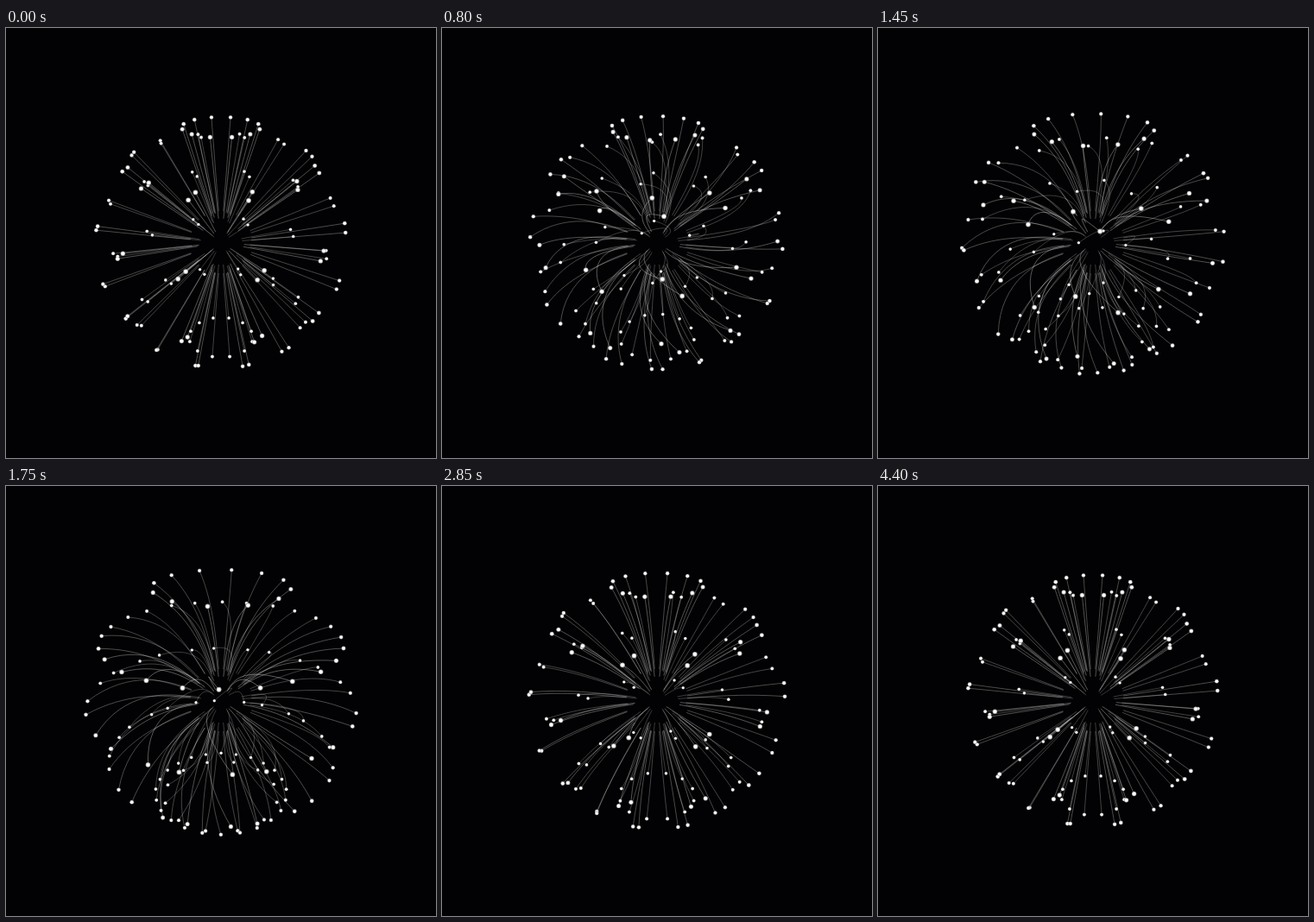
Recreate the animation shown at these times as an HTML page with a canvas. Size 498 px wide and 498 px high, loop 4450 ms.

```html
<!DOCTYPE html>
<html lang="en">
<head>
<meta charset="utf-8">
<title>Swaying sphere of stems</title>
<style>
  html, body { margin: 0; width: 100%; height: 100%; overflow: hidden; background: #020103; }
  canvas { display: block; }
</style>
</head>
<body>
<canvas id="stage" width="498" height="498"></canvas>
<script>
const ctx = document.getElementById('stage').getContext('2d');
const LOOP = 4450, STEP = 50;
const CX = 249, CY = 248.5, RADIUS = 141.4, CORE = 0.26, CAMERA = 590;
const RAD = Math.PI / 180;
const TILT = 27.5 * RAD, SIN_T = Math.sin(TILT), COS_T = Math.cos(TILT);
const SEGMENTS = 16, PER_RING = 12;

// Sway in degrees over time: a push, then a damped swing back to rest.
const times = [0, 400, 1150, 1750, 1880, 2350, 2850, 3450, 4400];
const sway = {
  upperTurn: [0, 17, 25.5, 18, 13, -7, 3.2, -1.8, 0],
  lowerTurn: [0, 15.8, 17, 2, 0, -2, 0.4, -1, 0],
  upperDrop: [0, 3, 13.2, 14.5, 15, -5, 2.4, -0.8, 0],
  lowerDrop: [0, 0, -0.7, 11.5, 14, -5, 3, -1, 0],
  poleDrop: [0, 0, 5.7, 11.5, 13, -5, 2.7, -0.9, 0],
  stretch: [1, 1, 1.024, 1.075, 1.1, 0.98, 1.019, 0.993, 1]
};

// Six latitudes; all but the two nearest the poles are split into a pair.
const rings = [];
for (let i = 0; i < 6; i++) {
  const mid = 90 + (i - 2.5) * 29.3;
  if (i === 0) rings.push({ theta: mid, shift: 0, kind: 'upper', pole: 1 });
  else if (i === 5) rings.push({ theta: mid, shift: 0, kind: 'lower', pole: -1 });
  else rings.push(
    { theta: mid - 1.6, shift: 1.6, kind: 'upper', pole: 0 },
    { theta: mid + 1.6, shift: -1.3, kind: 'lower', pole: 0 });
}

function slope(v, i) {
  if (i === 0 || i === v.length - 1) return 0;
  return (v[i + 1] - v[i - 1]) / (times[i + 1] - times[i - 1]);
}

function valueAt(v, t) {
  if (t >= times[times.length - 1]) return v[v.length - 1];
  let i = 0;
  while (t >= times[i + 1]) i++;
  const d = times[i + 1] - times[i], x = (t - times[i]) / d, y = 1 - x;
  return (1 + 2 * x) * y * y * v[i] + x * y * y * d * slope(v, i)
    + x * x * (3 - 2 * x) * v[i + 1] - x * x * y * d * slope(v, i + 1);
}

function project(theta, phi, r) {
  const ring = r * Math.sin(theta);
  const up = r * Math.cos(theta), front = ring * Math.cos(phi);
  const z = up * SIN_T + front * COS_T;
  const s = CAMERA / (CAMERA - z);
  return { x: CX + ring * Math.sin(phi) * s, y: CY - (up * COS_T - front * SIN_T) * s, s };
}

function drawStem(theta, phi, drop, turn, stretch) {
  let tip;
  ctx.beginPath();
  for (let i = 0; i <= SEGMENTS; i++) {
    const u = i / SEGMENTS, bend = u * u;
    const r = RADIUS * (CORE + (1 - CORE) * u) * (1 + (stretch - 1) * bend);
    tip = project((theta + drop * bend) * RAD, (phi + turn * bend) * RAD, r);
    ctx.lineTo(tip.x, tip.y);
  }
  ctx.lineWidth = 0.6 * tip.s;
  ctx.stroke();
  return tip;
}

function disc(p, r, color) {
  ctx.fillStyle = color;
  ctx.beginPath();
  ctx.arc(p.x, p.y, r, 0, 2 * Math.PI);
  ctx.fill();
}

function draw(t) {
  const now = {};
  for (const key in sway) now[key] = valueAt(sway[key], t);
  ctx.fillStyle = '#020103';
  ctx.fillRect(0, 0, 498, 498);
  ctx.strokeStyle = 'rgba(235,240,235,0.48)';
  const tips = [];
  for (const { theta, shift, kind, pole } of rings) {
    const drop = pole ? pole * now.poleDrop : now[kind + 'Drop'];
    const turn = now[kind + 'Turn'] * Math.sin(theta * RAD);
    for (let k = 0; k < PER_RING; k++) {
      tips.push(drawStem(theta, 15 + 30 * k + shift, drop, turn, now.stretch));
    }
  }
  tips.sort((a, b) => a.s - b.s);
  for (const p of tips) {
    disc(p, 2.2 * p.s, '#a8a8a8');
    disc(p, 1.6 * p.s, '#fff');
  }
}

const start = performance.now();
function tick() {
  const t = (performance.now() - start) % LOOP;
  draw(Math.floor(t / STEP) * STEP);
  requestAnimationFrame(tick);
}
tick();
</script>
</body>
</html>
```
